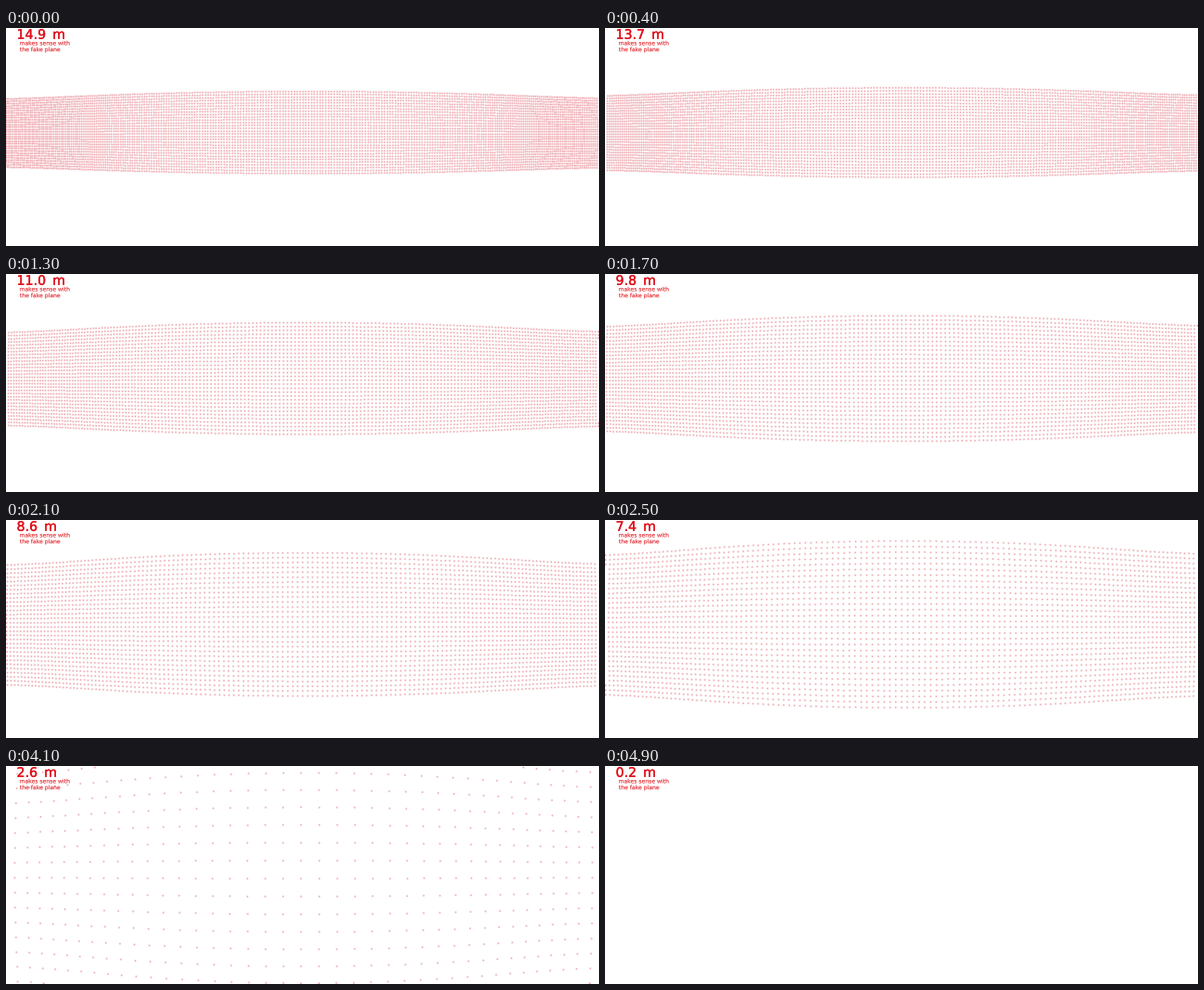
Write a matplotlib script that moves like this. It is 640x235 px and loops after 5 s.

```python
import numpy as np
import matplotlib.pyplot as plt
from matplotlib.animation import FuncAnimation
from matplotlib.patheffects import withStroke

W, H, DPI = 640, 235, 100
FRAMES, INTERVAL = 50, 100
START, STEP = 14.9, 0.3          # distance of the plane in metres

# Camera: sensor size, focal length and centre in pixels, lens distortion
SENSOR_W, SENSOR_H = 1392, 512
FOCAL_X, FOCAL_Y = 979.9, 974.1
CENTRE_X, CENTRE_Y = 690, 248.6
K1, K2, P1, P2 = -0.3746, 0.2049, 0.0011, 0.0014

# Scanner relative to the camera: small turns in radians, offsets in metres
YAW, PITCH = 0.0080, 0.0028
RIGHT, DOWN, FORWARD = -0.0138, -0.0554, -0.2919

DOT_RED = (205, 16, 36)
TEXT_RED = "#e0101a"
CAPTION_RED = "#e8484e"

# The plane: one dot every 10 cm, 40 m wide and 3 m high
SIDE, UP = (axis.ravel() for axis in
            np.meshgrid(np.arange(-200, 201) / 10, np.arange(-15, 15) / 10))

plt.rcParams["text.hinting"] = "none"
plt.rcParams["font.family"] = "DejaVu Sans"


def project(distance):
    """Sensor pixels of the plane's dots at the given distance."""
    depth = distance + FORWARD + YAW * SIDE - PITCH * UP
    ahead = depth > 0.01
    x = (YAW * distance + RIGHT - SIDE)[ahead] / depth[ahead]
    y = (-PITCH * distance + DOWN - UP)[ahead] / depth[ahead]
    r2 = x**2 + y**2
    radial = 1 + K1 * r2 + K2 * r2**2
    xd = x * radial + 2 * P1 * x * y + P2 * (r2 + 2 * x**2)
    yd = y * radial + P1 * (r2 + 2 * y**2) + 2 * P2 * x * y
    col = np.floor(CENTRE_X + FOCAL_X * xd).astype(int)
    row = np.floor(CENTRE_Y + FOCAL_Y * yd).astype(int)
    inside = (col > 0) & (col < SENSOR_W - 1) & (row > 0) & (row < SENSOR_H - 1)
    return col[inside], row[inside]


def sensor_image(distance):
    """White sensor picture with a small plus-shaped spot on every dot."""
    image = np.full((SENSOR_H, SENSOR_W, 3), 255, np.uint8)
    col, row = project(distance)
    for shift in (-1, 0, 1):
        image[row, col + shift] = DOT_RED
        image[row + shift, col] = DOT_RED
    return image


def add_text(x, baseline, text, height, color, stroke):
    points = 72 / DPI
    return ax.text(x, baseline, text, fontsize=height * points, color=color,
                   va="baseline",
                   path_effects=[withStroke(linewidth=stroke * points, foreground=color)])


fig = plt.figure(figsize=(W / DPI, H / DPI), dpi=DPI, facecolor="white")
ax = fig.add_axes([0, 0, 1, 1])
picture = ax.imshow(sensor_image(START), extent=(0, W, H, 0), aspect="auto",
                    interpolation="bicubic")
ax.set(xlim=(0, W), ylim=(H, 0))
ax.axis("off")

readout = add_text(11.5, 11.7, "", 14.2, TEXT_RED, 0.3)
add_text(14.5, 18.4, "makes sense with", 6.1, CAPTION_RED, 0)
add_text(14.9, 25.2, "the fake plane", 6.1, CAPTION_RED, 0)


def update(frame):
    distance = START - STEP * frame
    picture.set_data(sensor_image(distance))
    readout.set_text(f"{distance:.1f}\u2002m")
    return picture, readout


animation = FuncAnimation(fig, update, frames=FRAMES, interval=INTERVAL,
                          repeat=True, repeat_delay=0)
plt.show()
```
